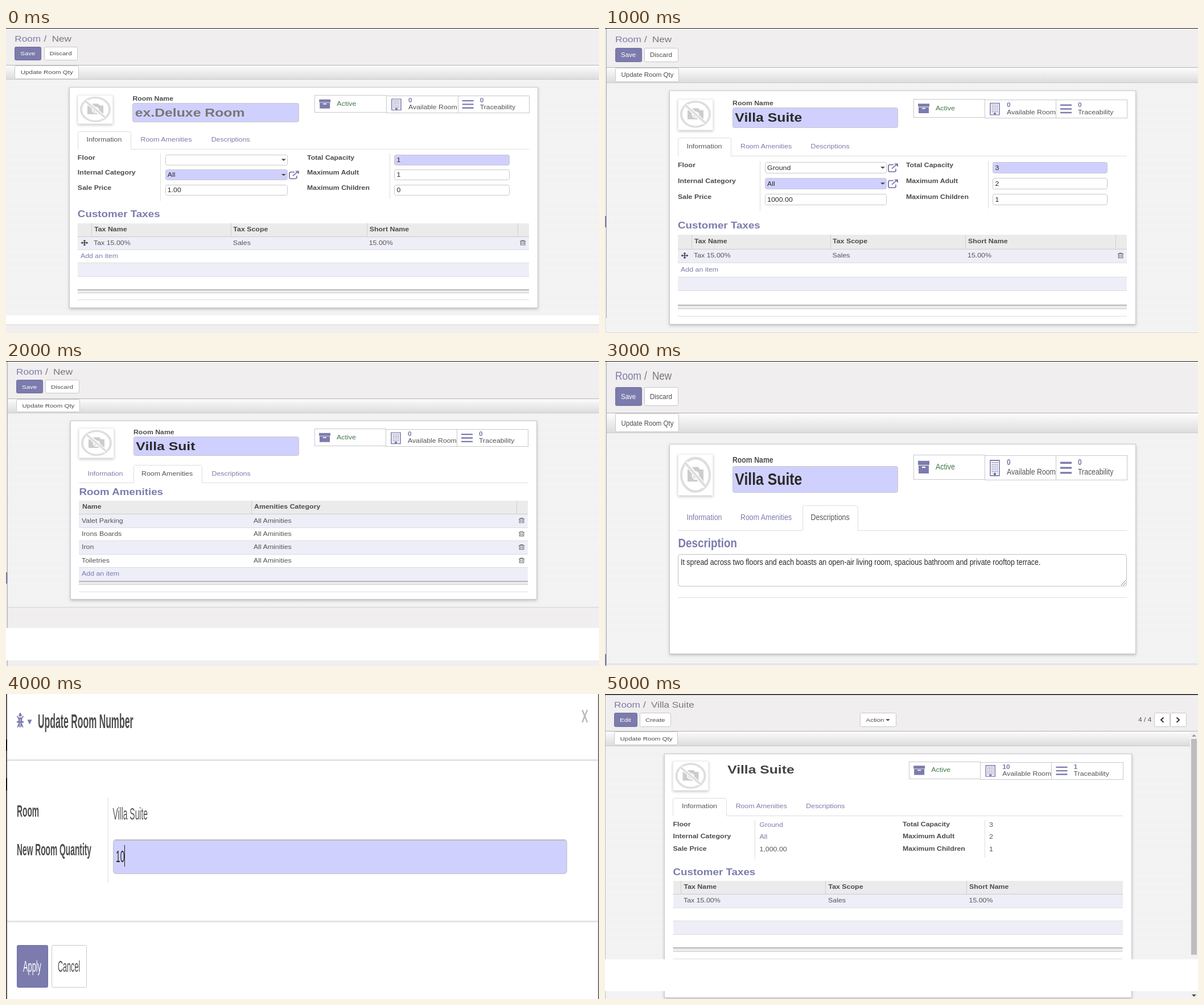
Write an HTML page that moves like this. It is 1042 by 537 pixels and loops after 6000 ms.

```html
<!DOCTYPE html>
<html lang="en">
<head>
<meta charset="utf-8">
<title>Room form</title>
<style>
  html, body { margin: 0; width: 100%; height: 100%; overflow: hidden; background: #fff; }
  svg { display: block; width: 1042px; height: 537px; font-family: "Liberation Sans", Arial, sans-serif; }
  text { white-space: pre; }
</style>
</head>
<body>
<svg id="stage" viewBox="0 0 1042 537"></svg>
<script>
const W = 1042, H = 537, STEP = 1000;
const PURPLE = '#7c7bad', INK = '#555', DARK = '#2a2a2a', LINE = '#ddd', EDGE = '#c8c8c8',
      FIELD = '#d0d0ff', STRIPE = '#eeeef8', PAGE = '#f0eeee';

// Current view: horizontal scale and shift, vertical scale, vertical stretch of glyphs.
let kx, ox, ky, stretch, out;
const X = x => x * kx + ox, Y = y => y * ky;
const put = markup => { out += markup; };

function view(scaleY, scaleX = 1, shiftX = 0) {
  ky = scaleY; kx = scaleX; ox = shiftX;
}

function box(x1, y1, x2, y2, fill, stroke, r = 0, extra = '') {
  const [l, t, e, b] = [X(x1), Y(y1), X(x2), Y(y2)].map(Math.round), o = stroke ? .5 : 0;
  put(`<rect x="${l + o}" y="${t + o}" width="${e - l - o * 2}" height="${b - t - o * 2}" rx="${r}"
    fill="${fill}" stroke="${stroke || 'none'}" ${extra}/>`);
}

function hline(x1, x2, y, color = LINE, w = 1) {
  put(`<rect x="${X(x1)}" y="${Math.round(Y(y))}" width="${X(x2) - X(x1)}" height="${w}" fill="${color}"/>`);
}

function vline(x, y1, y2, color = LINE, w = 1) {
  put(`<rect x="${Math.round(X(x))}" y="${Y(y1)}" width="${w}" height="${Y(y2) - Y(y1)}" fill="${color}"/>`);
}

// y is the middle of the capitals.
function text(s, x, y, fill = INK, size = 12.4, weight = 400) {
  const base = Y(y) + .344 * size * stretch;
  put(`<text transform="translate(${X(x)} ${base}) scale(1 ${stretch})" font-size="${size}"
    font-weight="${weight}" fill="${fill}">${s}</text>`);
}
const bold = (s, x, y, fill = '#4c4c4c', size = 12.4) => text(s, x, y, fill, size, 700);
const heading = (s, x, y) => bold(s, x, y, PURPLE, 18.8);

function icon(x, y, markup) {
  put(`<g transform="translate(${X(x)} ${Y(y)}) scale(1 ${stretch})">${markup}</g>`);
}

const caret = (x, y, fill = '#444') => icon(x, y, `<path d="M-4 -2h8l-4 4z" fill="${fill}"/>`);
const trash = (x, y) => icon(x, y, `<path d="M-5 -3.500H5M-2 -3.500V-5H2V-3.500M-3.700 -3.500V4.700H3.700V-3.500M-1.400 -1.500V3M1.400 -1.500V3"
  fill="none" stroke="#666" stroke-width="1.100"/>`);
const mover = (x, y) => icon(x, y, `<path d="M-5 0H5M0 -5V5" stroke="#444" stroke-width="1.600"/>
  <path d="M-6.500 0l3-2.700v5.400zM6.500 0l-3-2.700v5.400zM0 -6.500l2.700 3h-5.400zM0 6.500l2.700-3h-5.400z" fill="#444"/>`);
const link = (x, y) => icon(x, y, `<path d="M1 -6H-5Q-8 -6 -8 -3V5Q-8 8 -5 8H2Q5 8 5 5V2M-2 2L6 -6"
  fill="none" stroke="${PURPLE}" stroke-width="1.900"/><path d="M2 -8.500H9V-1.500z" fill="${PURPLE}"/>`);

function button(s, x1, x2, y1, y2, tx, primary, size = 11.5) {
  box(x1, y1, x2, y2, primary ? PURPLE : '#fff', primary ? '#6e6da2' : EDGE, 2);
  text(s, tx, (y1 + y2) / 2, primary ? '#fff' : '#4c4c4c', size);
}

function noPhoto() {
  box(128, 124.5, 190, 179.5, '#fff', '#eee', 0, 'filter="url(#soft)"');
  icon(159, 151.8, `<circle r="25" fill="none" stroke="#dedede" stroke-width="4"/>
    <path d="M-14 -8h6l3-4h10l3 4h6v18h-28z" fill="#ccc"/>
    <circle cy="1" r="5.500" fill="#ccc" stroke="#fff" stroke-width="2"/>
    <path d="M-17 -18L17 18" stroke="#fff" stroke-width="7"/>
    <path d="M-18 -18L18 18" stroke="#dedede" stroke-width="4"/>`);
}

function stats(rooms, traces) {
  box(542, 125, 668, 158, '#fff', EDGE);
  box(667, 126, 793, 159, '#fff', EDGE);
  box(792, 126, 918, 159, '#fff', EDGE);
  icon(560, 141.6, `<path d="M-10 -9.500h20v6h-20zM-9 -2.500h18v12h-18z" fill="${PURPLE}"/>
    <path d="M-3 0h6" stroke="#fff" stroke-width="2"/>`);
  text('Active', 581, 141, '#41774a', 12.5);
  icon(685, 142.7, `<path d="M-8 -11.500h16v23h-16z" fill="none" stroke="${PURPLE}" stroke-width="1.600"/>
    <path d="M-4.500 -9V8M-1.500 -9V8M1.500 -9V8M4.500 -9V8" stroke="${PURPLE}" stroke-width="1.700"
    stroke-dasharray="1.800 1.400"/><path d="M-2 7h4v4h-4z" fill="${PURPLE}"/>`);
  icon(810, 142.4, `<path d="M-10 -7.500h20M-10 0h20M-10 7.500h20" stroke="${PURPLE}" stroke-width="2.800"/>`);
  bold(rooms, 706, 135.2, PURPLE, 12);
  text('Available Room', 706, 147.8, INK, 12.3);
  bold(traces, 831, 135.2, PURPLE, 12);
  text('Traceability', 831, 147.8, INK, 12.3);
}

function tabs(active) {
  const items = [['Information', 128, 221, 143.5], ['Room Amenities', 224, 344, 238], ['Descriptions', 347, 444, 361.5]];
  const top = Math.round(Y(192.7)) + .5, low = Math.round(Y(225.3)) + .5;
  items.forEach(([s, x1, x2, tx], i) => {
    if (i === active) {
      const [l, r] = [x1, x2].map(x => Math.round(X(x)) + .5);
      put(`<path d="M${X(128)} ${low}H${l}V${top + 3}q0-3 3-3H${r - 3}q3 0 3 3V${low}H${X(917)}" fill="none" stroke="${LINE}"/>`);
    }
    text(s, tx, 208.2, i === active ? INK : PURPLE);
  });
}

// Bars above the sheet and the backdrop behind it; `end` is in stage pixels.
function backdrop(crumb, end) {
  put(`<rect width="${W}" height="${H}" fill="${PAGE}"/>
    <rect y="${Y(96)}" width="${W}" height="${end - Y(96)}" fill="url(#weave)"/>
    <rect y="${end}" width="${W}" height="1" fill="#d4d4d4"/>
    <rect y="${Y(70)}" width="${W}" height="${Y(26)}" fill="url(#bar)"/>
    <rect y="${Math.round(Y(69))}" width="${W}" height="1" fill="#b4b4b4"/>
    <rect y="${Math.round(Y(95.7))}" width="${W}" height="1" fill="#cacaca"/>
    <rect width="${W}" height="1" fill="#1a1a1a"/>`);
  text('Room', 18, 19.7, PURPLE, 17.2);
  text('/', 69, 19.7, '#777', 17.2);
  text(crumb, 83, 19.7, '#777', 17.1);
  button('Update Room Qty', 18, 130, 70, 95, 28.5);
}

function sheet(bottom) {
  box(113, 110.3, 933, bottom / ky, '#fff', '#c8c8d3', 0, 'filter="url(#soft)"');
}

function editor(title, tab, bottom, end) {
  backdrop('New', end);
  button('Save', 18, 64.5, 35, 60, 28, true);
  button('Discard', 69, 128.5, 35, 60, 79);
  sheet(bottom);
  noPhoto();
  bold('Room Name', 224, 132, '#4c4c4c', 12.3);
  box(224, 140, 515, 176, FIELD, EDGE, 3);
  bold(title || 'ex.Deluxe Room', 228.3, 157.6, title ? DARK : '#777', 24.8);
  stats('0', '0');
  tabs(tab);
}

function table({ x1, x2, top, h, cols, heads, headX, rows, cellX, count, bins, movers }) {
  const rowTop = i => top + h * (i + 1);
  box(x1, top, x2, top + h, '#ebebeb');
  cols.forEach(x => vline(x, top, top + h, '#d0d0d0'));
  heads.forEach((s, i) => bold(s, headX[i], top + h * .46));
  for (let i = 0; i < count; i++) {
    const mid = rowTop(i) + h * .49, row = rows[i] || [];
    if (i % 2 === 0) box(x1, rowTop(i), x2, rowTop(i + 1), STRIPE);
    hline(x1, x2, rowTop(i), i ? LINE : '#ccc');
    if (row.length === 1) text(row[0], 133, mid, PURPLE);
    else row.forEach((s, j) => text(s, cellX[j], mid));
    if (bins && row.length > 1) trash(906, mid);
    if (movers && row.length > 1) mover(140, mid);
  }
  const foot = rowTop(count);
  box(x1, foot, x2, foot + 7, '#ececec');
  hline(x1, x2, foot, '#b8b8b8', 2);
  hline(x1, x2, foot + 6.5, '#ccc');
  hline(x1, x2, foot + 19.5, LINE);
}

const leftLabels = ['Floor', 'Internal Category', 'Sale Price'],
      rightLabels = ['Total Capacity', 'Maximum Adult', 'Maximum Children'],
      taxHeads = ['Tax Name', 'Tax Scope', 'Short Name'],
      taxRow = ['Tax 15.00%', 'Sales', '15.00%'];

function infoFields(left, right) {
  vline(272, 234.5, 322);
  vline(673, 234.5, 318);
  leftLabels.forEach((s, i) => {
    const y = 246 + 28 * i;
    bold(s, 128, y - 4.3);
    bold(rightLabels[i], 529, y - 4.3, '#4c4c4c', 12.3);
    box(281, y - 10, 495, y + 10, i === 1 ? FIELD : '#fff', EDGE, 3);
    box(681, y - 10, 883, y + 10, i === 0 ? FIELD : '#fff', EDGE, 3);
    text(left[i], 285, y, DARK);
    text(right[i], 685.5, y, DARK);
    if (i < 2) caret(488, y);
    if (i < 2 && left[i]) link(506, y);
  });
  heading('Customer Taxes', 128, 347);
  table({
    x1: 128, x2: 917, top: 364, h: 24.6, cols: [152, 396, 633, 897], heads: taxHeads,
    headX: [157, 400, 638], rows: [taxRow, ['Add an item']], cellX: [156, 399.5, 637],
    count: 4, bins: true, movers: true
  });
}

function leftEdge(mark, end, low = end) {
  put(`<rect y="1" width="2" height="${end}" fill="#e9e7ea"/><rect x="2" y="1" width="1" height="${low}" fill="#aaa"/>
    <rect y="${mark}" width="2" height="20" fill="${PURPLE}"/>`);
}

const band = (y1, y2) => put(`<rect y="${y1}" width="${W}" height="${y2 - y1}" fill="#fff"/>`);

function emptyForm() {
  stretch = .838;
  view(.944, 1.0055, -2.83);
  editor('', 0, 493, 506);
  infoFields(['', 'All', '1.00'], ['1', '1', '0']);
  band(506, 522);
  put(`<rect y="522" width="${W}" height="1" fill="#d4d4d4"/>`);
}

function filledForm() {
  stretch = .888;
  view(1);
  editor('Villa Suite', 0, 522, 536);
  infoFields(['Ground', 'All', '1000.00'], ['3', '2', '1']);
  leftEdge(331, 536, 510);
}

function amenities() {
  stretch = .845;
  view(.9515);
  editor('Villa Suit', 1, 420, 433);
  view(1);
  heading('Room Amenities', 128.5, 230.5);
  const names = ['Valet Parking', 'Irons Boards', 'Iron', 'Toiletries'];
  table({
    x1: 128, x2: 917, top: 246, h: 23.43, cols: [431, 897], heads: ['Name', 'Amenities Category'],
    headX: [134, 436], rows: [...names.map(n => [n, 'All Aminities']), ['Add an item']],
    cellX: [133, 435], count: 5, bins: true
  });
  leftEdge(372, 536);
  band(470, 527);
}

function description() {
  stretch = 1.172;
  view(1.3205);
  editor('Villa Suite', 2, 516, 533);
  view(1);
  heading('Description', 128.5, 320);
  box(128, 340, 917, 397, '#fff', '#c0c0c0', 4);
  text('It spread across two floors and each boasts an open-air living room, spacious bathroom and private rooftop terrace.',
    133, 354, DARK);
  put('<path d="M907 395l8-9M911 395l4-4.500" stroke="#777"/>');
  hline(128, 917, 416);
  leftEdge(516, 536);
}

function dialog() {
  stretch = 2.15;
  view(1);
  put(`<rect width="${W}" height="${H}" fill="#fff"/>`);
  icon(25, 46, `<g fill="none" stroke="${PURPLE}" stroke-width="1.300"><path d="M-5.500 -3.500L-3 -1.500H3L5.500 -3.500M-6 1.500H6M-5 6L-3 3.500M5 6L3 3.500"/></g>
    <path d="M-2.500 -3a2.500 3 0 0 1 5 0zM-3.200 -2h2.700v8q-2.700 0-2.700-3zM3.200 -2h-2.700v8q2.700 0 2.700-3z" fill="${PURPLE}"/>`);
  caret(41.5, 49.5, PURPLE);
  bold('Update Room Number', 56, 48.5, '#4c4c4c', 15.9);
  put('<path d="M1012.500 28L1021.500 50M1021.500 28L1012.500 50" stroke="#bbb" stroke-width="2.500"/>');
  hline(2, 1040, 115, '#e3e3e3', 3);
  hline(2, 1040, 399, '#e3e3e3', 3);
  bold('Room', 19, 206, '#4c4c4c', 13.8);
  bold('New Room Quantity', 19, 273.5, '#4c4c4c', 13.8);
  vline(179, 183, 333);
  text('Villa Suite', 187.5, 211, INK, 13.9);
  box(188, 256, 986, 317, FIELD, '#c0c0c0', 5);
  hline(191, 983, 256, '#bbb', 2);
  text('10', 193, 286, DARK, 13.9);
  vline(208, 266, 304, '#222');
  button('Apply', 19, 74, 442, 517, 30, true, 12.8);
  button('Cancel', 80, 142, 442, 517, 91, false, 12.6);
  put(`<rect width="2" height="${H}" fill="#555"/><rect x="1040.500" width="1.500" height="${H}" fill="#555"/>
    <path d="M0 80h2v20h-2zM0 148h2v22h-2z" fill="#111"/>`);
}

function savedRoom() {
  stretch = .843;
  view(.949, 1, -2);
  backdrop('Villa Suite', H);
  button('Edit', 18, 59, 35, 61, 28, true);
  button('Create', 63, 118, 35, 61, 73);
  button('Action', 450, 514, 35, 61, 460.5);
  caret(499, 48.3);
  text('4 / 4', 939, 47.6, INK, 12);
  button('', 967, 995, 35, 61, 0);
  button('', 994.5, 1024, 35, 61, 0);
  icon(981, 48, '<path d="M2.500 -5L-2 0L2.500 5" fill="none" stroke="#333" stroke-width="2.200"/>');
  icon(1009, 48, '<path d="M-2.500 -5L2 0L-2.500 5" fill="none" stroke="#333" stroke-width="2.200"/>');
  view(.949, 1.0015, -8.7);
  sheet(535);
  noPhoto();
  bold('Villa Suite', 223.5, 139.5, '#444', 24.7);
  stats('10', '1');
  tabs(0);
  view(1);
  vline(263, 222, 291);
  vline(667, 222, 288);
  const left = ['Ground', 'All', '1,000.00'], right = ['3', '2', '1'];
  leftLabels.forEach((s, i) => {
    const y = 229 + 21.6 * i;
    bold(s, 119.5, y);
    bold(rightLabels[i], 523, y, '#4c4c4c', 12.3);
    text(left[i], 271.5, y + 1.3, i < 2 ? PURPLE : INK);
    text(right[i], 675, y + 1.3);
  });
  heading('Customer Taxes', 119.5, 313.5);
  table({
    x1: 119.5, x2: 909.5, top: 329, h: 23.4, cols: [133, 387, 635], heads: taxHeads,
    headX: [138.5, 392.5, 640], rows: [taxRow], cellX: [138, 392, 639.5], count: 4
  });
  put(`<rect x="1028" y="67" width="14" height="470" fill="#f1f1f1"/>
    <rect x="1030" y="79" width="10" height="380" fill="#bdbdbd"/>
    <path d="M1031 75h8l-4-4z" fill="#999"/><path d="M1031 529h8l-4 4z" fill="#444"/>
    <rect y="1" width="1" height="536" fill="#bbb"/><rect width="${W}" height="1.600" fill="#1a1a1a"/>`);
  band(467, 523);
}

const scenes = [emptyForm, filledForm, amenities, description, dialog, savedRoom].map(draw => {
  out = '';
  draw();
  return `<g visibility="hidden">${out}</g>`;
});

const stage = document.getElementById('stage');
stage.innerHTML = `<defs>
  <pattern id="weave" width="4" height="4" patternUnits="userSpaceOnUse">
    <rect width="4" height="4" fill="#f5f5f5"/>
    <path d="M0 0h1v1h-1zM2 0h1v1h-1zM1 2h1v1h-1zM3 2h1v1h-1z" fill="#ebebeb"/>
  </pattern>
  <linearGradient id="bar" x2="0" y2="1"><stop stop-color="#fcfcfc"/><stop offset="1" stop-color="#dcdcdc"/></linearGradient>
  <filter id="soft" x="-10%" y="-10%" width="120%" height="125%">
    <feDropShadow dx="0" dy="2" stdDeviation="2.500" flood-opacity=".22"/>
  </filter></defs>` + scenes.join('');

const groups = [...stage.children].slice(1);
function tick() {
  const current = Math.floor(performance.now() / STEP) % groups.length;
  groups.forEach((g, i) => g.setAttribute('visibility', i === current ? 'visible' : 'hidden'));
  requestAnimationFrame(tick);
}
tick();
</script>
</body>
</html>
```
